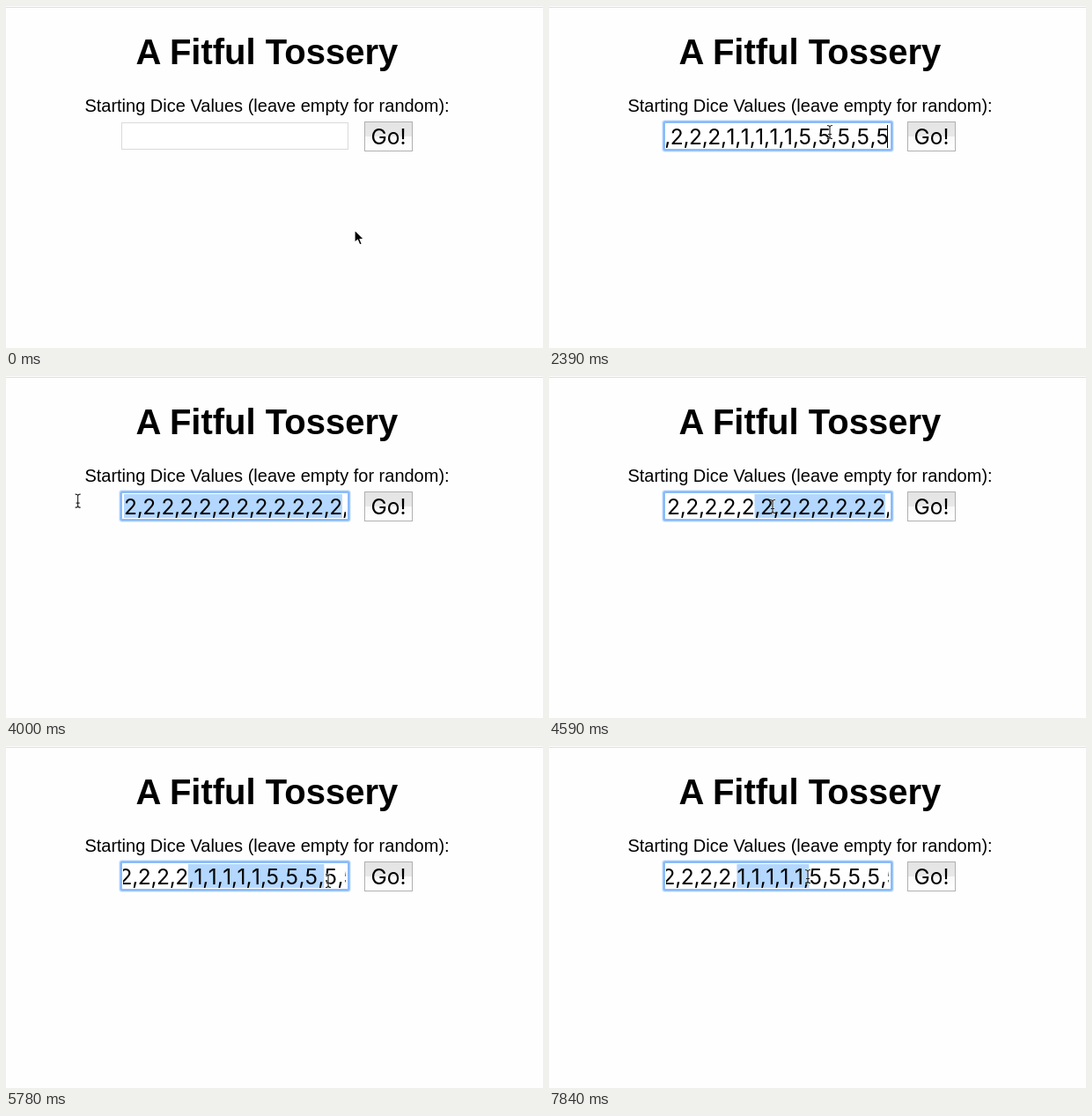
An HTML page that plays this animation: 610x388 px, repeating every 7.99 s.

```html
<!DOCTYPE html>
<html lang="en">
<head>
<meta charset="utf-8">
<title>Dice values</title>
<style>
  html, body { margin: 0; width: 100%; height: 100%; overflow: hidden; background: #fefefe; }
  svg { display: block; }
  .page { font-family: "Liberation Sans", Arial, sans-serif; text-anchor: middle; }
  .control { font-family: Inter, "Open Sans", sans-serif; font-size: 24.5px; }
</style>
</head>
<body>
<svg width="610" height="388" viewBox="0 0 610 388">
  <defs>
    <clipPath id="inner"><rect x="133" y="134" width="253" height="28"/></clipPath>
    <linearGradient id="face" x1="0" y1="0" x2="0" y2="1">
      <stop offset="0" stop-color="#e4e4e4"/>
      <stop offset=".5" stop-color="#e8e8e8"/>
      <stop offset=".5" stop-color="#f8f8f8"/>
      <stop offset="1" stop-color="#fff"/>
    </linearGradient>
    <path id="beamShape" d="M-3-7.5Q0-7.5 0-5.5Q0-7.5 3-7.5M0-5.5V5.5M-3 7.5Q0 7.5 0 5.5Q0 7.5 3 7.5M-2 2.5H2"/>
  </defs>

  <rect width="610" height="388" fill="#fefefe"/>
  <rect y="1" width="610" height="1" fill="#dedede"/>
  <text class="page" x="296.3" y="66" font-size="40" font-weight="700">A Fitful Tossery</text>
  <text class="page" x="296.5" y="120" font-size="20">Starting Dice Values (leave empty for random):</text>

  <rect x="131.5" y="132.5" width="257" height="30" fill="#fff" stroke="#dadada"/>
  <g id="ring">
    <rect x="128" y="129" width="264" height="37" rx="4" fill="#dfedfd"/>
    <rect x="129" y="130" width="262" height="35" rx="3" fill="#a3cbfa"/>
    <rect x="130" y="131" width="260" height="33" rx="2" fill="#82b6f8"/>
    <rect x="131" y="132" width="258" height="31" rx="1" fill="#93c0f8"/>
    <rect x="132" y="133" width="256" height="29" fill="#fff"/>
  </g>
  <g clip-path="url(#inner)">
    <rect id="mark" y="134" height="27" fill="#b3d7fe"/>
    <text id="value" class="control" y="157"></text>
  </g>
  <rect id="caret" y="135" width="1" height="26"/>

  <rect x="407.5" y="131.5" width="54" height="33" fill="url(#face)" stroke="#b0b0b0"/>
  <text class="control" x="434.5" y="157" text-anchor="middle">Go!</text>

  <path id="arrow" d="M0 0V14.5L3.4 11.4L5.8 17L8.4 15.9L6 10.5H10.6Z"
        stroke="#fff" stroke-width="1.2" stroke-linejoin="round"/>
  <g id="beam" fill="none">
    <use href="#beamShape" stroke="#fff" stroke-width="2.4" opacity=".6"/>
    <use href="#beamShape" stroke="#222" stroke-width="1.1"/>
  </g>
</svg>
<script>
const LOOP = 7990, TICK = 148, LAST_TICK = 53;
const LEFT = 134, RIGHT = 386;
// Moments below are counted in ticks, the rate at which the screen refreshes.
const BEAM = 6, FOCUS = 8, PASTE = 14, MOUSE_BACK = 16, BLINK = 3;
const $ = id => document.getElementById(id);

const digits = '2'.repeat(12) + '1'.repeat(5) + '5'.repeat(5);
const digitWidth = { 2: 14.7, 1: 9.9, 5: 15 };
const pairWidth = { 2: 21.2, 1: 16.4, 5: 22 };

// Left edge of every character; the last one is the end of the text.
const edges = [];
let pen = 0;
for (const d of digits) {
  edges.push(pen, pen + digitWidth[d]);
  pen += pairWidth[d];
}
const END = edges.length - 1;

const moves = [
  { from: 2, to: 4, x: 330, y: 127 },
  { from: 4, to: 7, x: 319, y: 143 },
  { from: 16, to: 24, x: 192, y: 152 },
  { from: 25, to: 28, x: 43, y: 138 },
  { from: 29, to: 31, x: 254, y: 148 },
  { from: 31, to: 35, x: 362, y: 163 },
  { from: 35, to: 39, x: 366, y: 153 },
  { from: 40, to: 47, x: 214, y: 148 },
  { from: 48, to: 53, x: 294, y: 148 }
];
const drags = [
  { from: 24, to: 35, anchor: 23 },
  { from: 38, to: 42, anchor: 23 },
  { from: 47, to: 54, anchor: 24 }
];
const scrolls = [
  { from: 0, by: 187 },
  { from: 27, by: 0 },
  { from: 38, by: 175 }
];

const clamp = (v, lo, hi) => Math.min(hi, Math.max(lo, v));
const smooth = u => u * u * (3 - 2 * u);
const show = (el, on) => el.setAttribute('visibility', on ? 'visible' : 'hidden');
const place = (el, x, y) => el.setAttribute('transform', `translate(${x} ${y})`);

function pointerAt(tick) {
  let x = 396, y = 254;
  for (const m of moves) {
    const e = smooth(clamp((tick - m.from) / (m.to - m.from), 0, 1));
    x += (m.x - x) * e;
    y += (m.y - y) * e;
  }
  return { x, y };
}

function nearestEdge(x) {
  const gap = i => Math.abs(edges[i] - x);
  return edges.reduce((best, _, i) => gap(i) < gap(best) ? i : best, 0);
}

// The selected range as character indices; an empty range is a caret.
function selectionAt(tick, scroll) {
  const drag = drags.find(d => tick >= d.from && tick < d.to);
  if (drag) {
    // The highlight trails slightly behind the pointer.
    const head = nearestEdge(pointerAt(tick - 0.4).x - LEFT + scroll);
    return [Math.min(head, drag.anchor), Math.max(head, drag.anchor)];
  }
  const blinkOn = (tick - FOCUS) % (2 * BLINK) < BLINK;
  if (tick < FOCUS || tick >= drags[0].from || !blinkOn) return null;
  return tick < PASTE ? [0, 0] : [END, END];
}

function draw(t) {
  const tick = Math.min(LAST_TICK, Math.floor((t + 10) / TICK));
  const scroll = scrolls.findLast(s => tick >= s.from).by;
  const edgeX = i => clamp(LEFT + edges[i] - scroll, LEFT, RIGHT);

  show($('ring'), tick >= FOCUS);
  show($('value'), tick >= PASTE);
  place($('value'), LEFT - scroll, 0);

  const range = selectionAt(tick, scroll);
  const [from, to] = range || [0, 0];
  $('mark').setAttribute('x', edgeX(from));
  $('mark').setAttribute('width', edgeX(to) - edgeX(from));
  show($('caret'), range && from === to);
  $('caret').setAttribute('x', Math.min(384, Math.round(edgeX(from))));

  const { x, y } = pointerAt(tick);
  const typing = tick >= PASTE && tick < MOUSE_BACK;
  show($('arrow'), tick < BEAM);
  show($('beam'), tick >= BEAM && !typing);
  place($('arrow'), x, y);
  place($('beam'), x, y);
}

$('value').textContent = [...digits].join(',');
$('value').setAttribute('x', edges.map(x => x.toFixed(2)).join(' '));

const start = performance.now();
function animate() {
  draw((performance.now() - start) % LOOP);
  requestAnimationFrame(animate);
}
animate();
</script>
</body>
</html>
```
